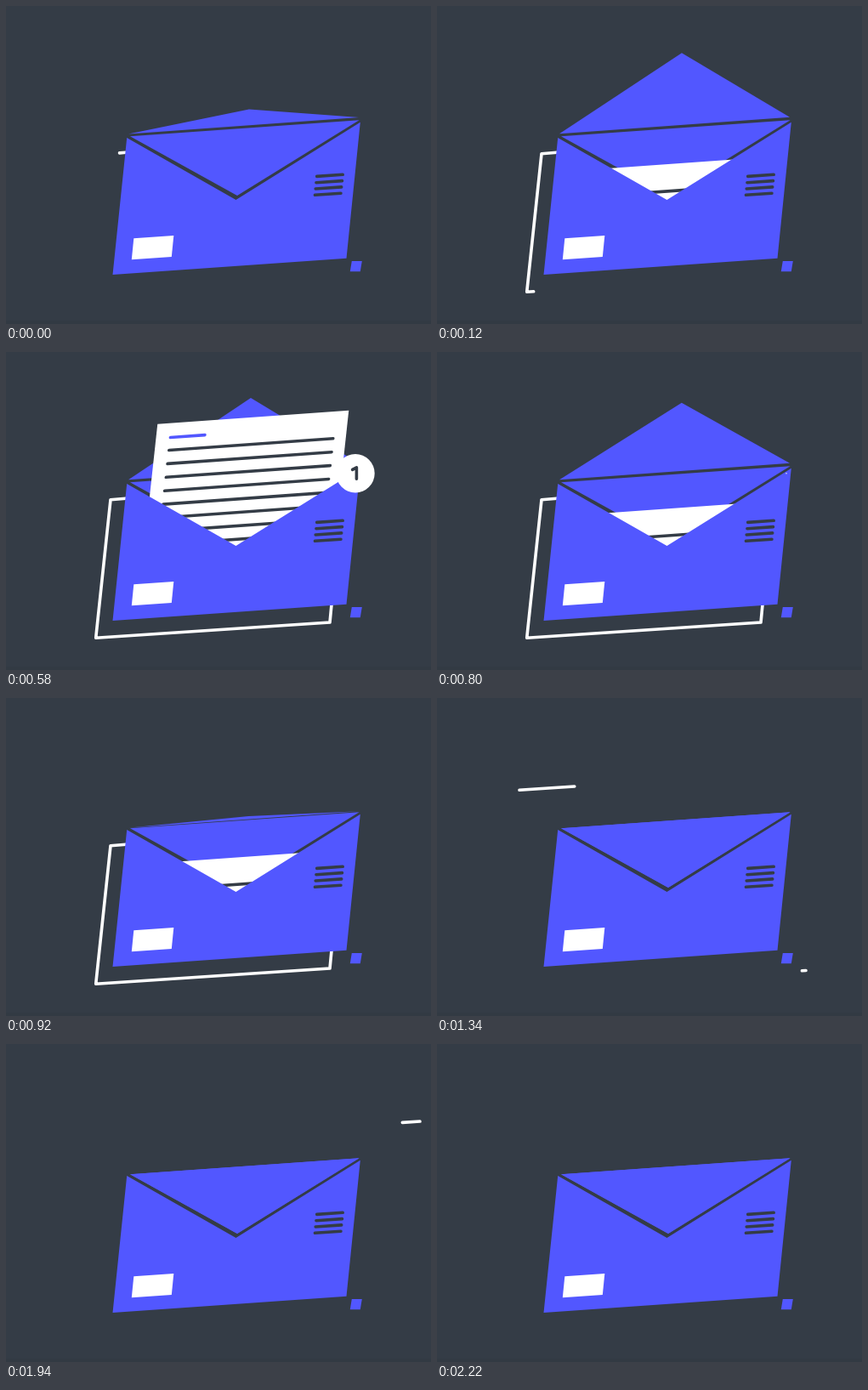
Animation, 500 px wide and 374 px high, one loop 2.3 s. Source, as an HTML page with a canvas:

```html
<!DOCTYPE html>
<html lang="en">
<head>
<meta charset="utf-8">
<title>Envelope</title>
<style>
  html, body { margin: 0; width: 100%; height: 100%; overflow: hidden; background: #343c46; }
  canvas { display: block; }
</style>
</head>
<body>
<canvas id="stage" width="500" height="374"></canvas>
<script>
const ctx = document.getElementById('stage').getContext('2d');
const LOOP = 2300, STEP = 20, LAST_STEP = 2220;
const DARK = '#343c46', BLUE = '#5257ff', WHITE = '#fff';

const clamp = v => Math.max(0, Math.min(1, v));
const mix = (a, b, p) => a + (b - a) * p;
const ease = (t, start, duration) => {
  const p = clamp((t - start) / duration);
  return p * p * (3 - 2 * p);
};

function trace(points) {
  ctx.beginPath();
  points.forEach(([x, y]) => ctx.lineTo(x, y));
}

function polygon(color, ...points) {
  trace(points);
  ctx.closePath();
  ctx.fillStyle = color;
  ctx.fill();
}

function stroke(color, width, ...points) {
  trace(points);
  ctx.strokeStyle = color;
  ctx.lineWidth = width;
  ctx.lineCap = ctx.lineJoin = 'round';
  ctx.stroke();
}

// Part of a polyline between two fractions of its length
function trimmed(points, from, to) {
  const lengths = points.slice(1).map(([x, y], i) => Math.hypot(x - points[i][0], y - points[i][1]));
  const total = lengths.reduce((a, b) => a + b, 0);
  const result = [];
  let walked = 0;
  lengths.forEach((length, i) => {
    const a = clamp((from * total - walked) / length);
    const b = clamp((to * total - walked) / length);
    if (b > a) {
      for (const p of [a, b]) {
        result.push([mix(points[i][0], points[i + 1][0], p), mix(points[i][1], points[i + 1][1], p)]);
      }
    }
    walked += length;
  });
  return result;
}

const OUTLINE = [[141, 172.3], [123, 173.7], [105.7, 336.3], [381, 318], [383, 297]];

function drawOutline(t) {
  const part = trimmed(OUTLINE, ease(t, 925, 310), ease(t, -25, 337));
  if (part.length) stroke(WHITE, 3.6, ...part);
}

// endY is the height at the left end, where the streak vanishes
const STREAKS = [
  { from: 487, to: 300, endY: 245, start: 1060, duration: 220, lag: 60 },
  { from: 365, to: 97, endY: 108.3, start: 1036, duration: 300, lag: 100 },
  { from: 434, to: 90, endY: 343.5, start: 1325, duration: 220, lag: 70 },
  { from: 487, to: 28, endY: 182.3, start: 1364, duration: 240, lag: 70 },
  { from: 487, to: 46, endY: 253.7, start: 1379, duration: 240, lag: 70 },
  { from: 487, to: 14, endY: 314.5, start: 1473, duration: 260, lag: 70 },
  { from: 430, to: 153, endY: 182.3, start: 1386, duration: 240, lag: 70, front: true },
  { from: 487, to: 189, endY: 111, start: 1903, duration: 230, lag: 80, front: true }
];

function drawStreaks(t, front) {
  for (const s of STREAKS) {
    if (!!s.front !== front) continue;
    const head = ease(t, s.start, s.duration);
    const tail = ease(t, s.start + s.lag, s.duration);
    if (head <= tail) continue;
    const point = p => {
      const x = mix(s.from, s.to, p);
      return [x, s.endY - (x - s.to) * 0.067];
    };
    stroke(WHITE, 3.6, point(tail), point(head));
  }
}

function drawLetter(t) {
  if (t > 1085) return;
  const shift = t < 400
    ? mix(168, -49, ease(t, 0, 375))
    : mix(-49, 117, ease(t, 418, 417));
  ctx.save();
  ctx.beginPath();
  ctx.rect(0, 0, 500, 280);
  ctx.clip();
  ctx.transform(1, -0.071, -0.109, 1, 179 - shift * 0.109, 78 + shift);
  ctx.fillStyle = WHITE;
  ctx.fillRect(0, 0, 225, 240);
  stroke(BLUE, 3.6, [17, 17], [57.5, 17]);
  for (let i = 0; i < 11; i++) {
    const y = 32 + i * 15.9;
    stroke(DARK, 3.6, [17, y], [210, y]);
  }
  ctx.restore();
}

function drawOpenFlap(s) {
  const gap = 3 * Math.min(1, s * 4);
  polygon(BLUE, [144, 153.2 - gap], [285.3 + 2.7 * s, 143.5 - gap - 86.5 * s], [415, 133.8 - gap]);
}

function drawClosingFlap(s) {
  const left = [146, 153.3], right = [415.5, 134.2];
  const tip = [285.3 - 13.3 * s, 143.5 + 79.5 * s];
  if (s < 1) stroke(DARK, 5, left, tip, right);
  polygon(BLUE, left, tip, right);
}

function drawFront() {
  polygon(BLUE, [142.2, 155], [270.5, 228], [416.8, 136.8], [400.5, 296.7], [125.5, 316]);
  polygon(WHITE, [150.3, 273.3], [197.3, 270], [194.8, 295], [147.8, 298.3]);
  for (let i = 0; i < 4; i++) {
    const x = 365.7 - i * 0.75, y = 200.4 + i * 7.3;
    stroke(DARK, 3.6, [x, y], [x + 30.5, y - 2.1]);
  }
}

function drawBadge(t) {
  const scale = ease(t, 150, 160) - ease(t, 640, 180);
  if (scale <= 0) return;
  ctx.save();
  ctx.translate(411, 142.7);
  ctx.scale(scale, scale);
  ctx.fillStyle = WHITE;
  ctx.beginPath();
  ctx.arc(0, 0, 22.7, 0, Math.PI * 2);
  ctx.fill();
  const digit = trimmed([[-3.4, -4.3], [1.4, -6.8], [1.4, 6.6]], 0, ease(t, 280, 140));
  if (digit.length) stroke(DARK, 3.6, ...digit);
  ctx.restore();
}

function draw(t) {
  ctx.fillStyle = DARK;
  ctx.fillRect(0, 0, 500, 374);
  ctx.fillStyle = '#323a43';
  ctx.fillRect(0, 370, 500, 4);

  const flap = 2 * (ease(t, -184, 320) - ease(t, 765, 320)) - 1;
  drawOutline(t);
  drawStreaks(t, false);
  if (flap > 0) drawOpenFlap(flap);
  polygon(DARK, [142.2, 155], [270.5, 228], [416.8, 136.8]);
  polygon(BLUE, [146, 153.3], [272, 223], [415.5, 134.2]);
  drawLetter(t);
  drawFront();
  if (flap <= 0) drawClosingFlap(-flap);
  polygon(BLUE, [406.8, 300], [418.8, 300], [416.8, 312.3], [404.8, 312.3]);
  drawBadge(t);
  drawStreaks(t, true);
}

const origin = performance.now();
function frame() {
  const t = (performance.now() - origin) % LOOP;
  draw(Math.min(LAST_STEP, Math.floor(t / STEP) * STEP));
  requestAnimationFrame(frame);
}
frame();
</script>
</body>
</html>
```
